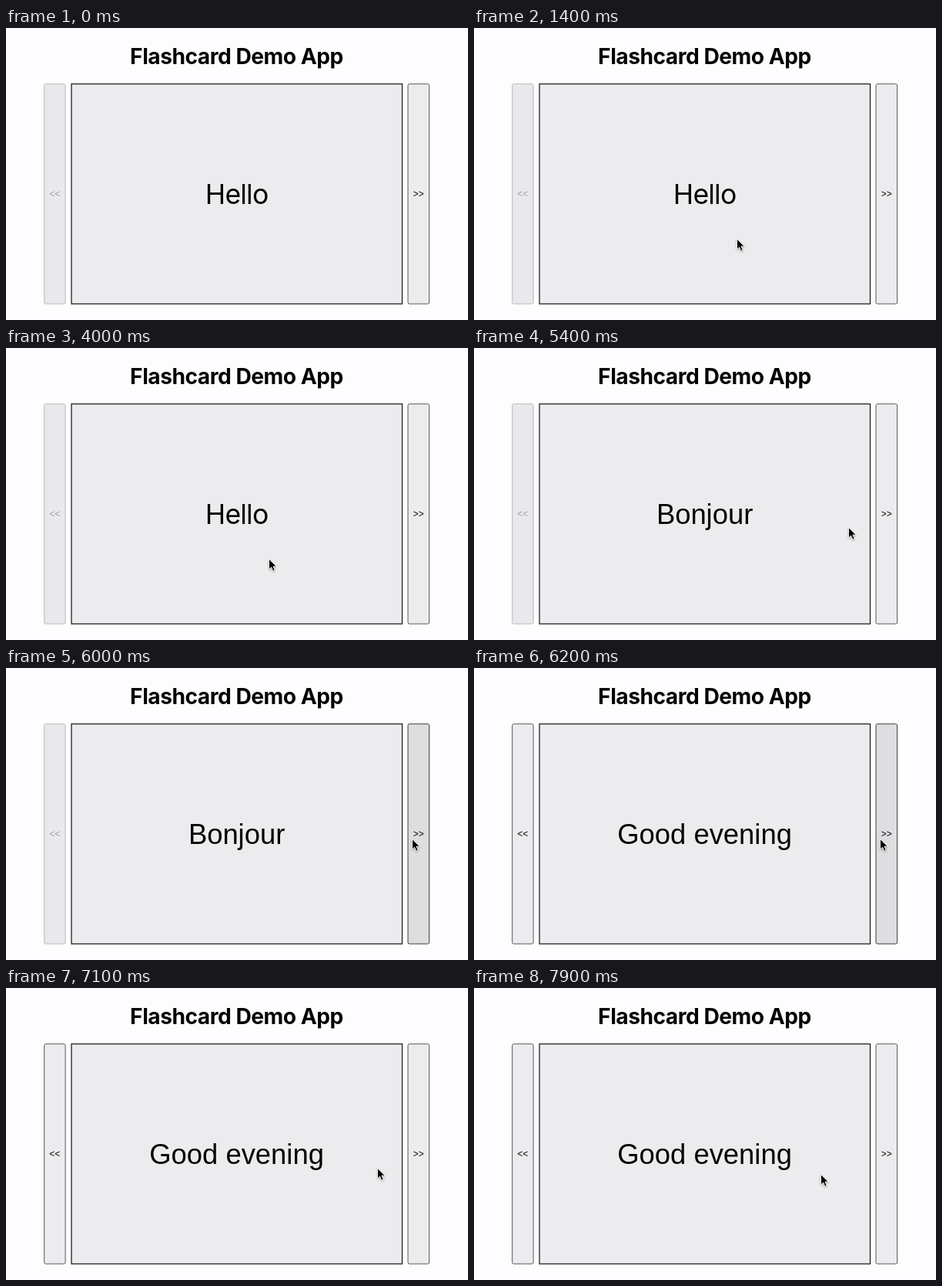
Animation, 600 px wide and 380 px high, one loop 8000 ms. Source, as an HTML page:

```html
<!DOCTYPE html>
<html lang="en">
<head>
<meta charset="utf-8">
<title>Flashcard Demo App</title>
<style>
html, body { margin: 0; width: 100%; height: 100%; overflow: hidden; background: #fdfcfe; }
svg { display: block; width: 600px; height: 380px; }
text { text-anchor: middle; fill: #050505; }
.title { font: 700 28.2px Inter, sans-serif; letter-spacing: -.5px; }
.word { font: 36.4px "Liberation Sans", Arial, sans-serif; }
.greeting { font: 35.5px Inter, sans-serif; letter-spacing: -.8px; }
.label { font: 12px "Liberation Sans", Arial, sans-serif; }
.card { fill: #ecebee; stroke: #19191b; stroke-width: 1.25; }
.button rect { fill: #ecebee; stroke: #58585a; }
.button.disabled rect { fill: #e9e8eb; stroke: #b9b8bb; }
.button.disabled text { fill: #a2a1a4; }
.button.hover rect { fill: #dedde0; stroke: #3c3c3e; }
#cursor { filter: drop-shadow(0 1px 1px #0005); }
</style>
</head>
<body>
<svg viewBox="0 0 600 380">
  <text class="title" x="299.5" y="47">Flashcard Demo App</text>
  <rect class="card" x="85" y="72.8" width="429.5" height="286.2"/>
  <text id="word" x="299.6" y="228.5"></text>
  <g id="prev" class="button">
    <rect x="49.7" y="72.8" width="27.4" height="286.2" rx="2"/>
    <text class="label" x="63.3" y="219.5">&lt;&lt;</text>
  </g>
  <g id="next" class="button">
    <rect x="522" y="72.8" width="27.6" height="286.2" rx="2"/>
    <text class="label" x="535.8" y="219.5">&gt;&gt;</text>
  </g>
  <path id="cursor" d="M0 0V13.6L3.1 10.7L5.3 15.8L7.7 14.8L5.5 9.7H9.7Z"
        fill="#000" stroke="#fff" stroke-width=".9" stroke-linejoin="round"/>
</svg>
<script>
const LOOP = 8000, TICK = 100;
const [word, prev, next, cursor] =
  ["word", "prev", "next", "cursor"].map(id => document.getElementById(id));

// [time, x, y]
const path = [
  [900, 337, 307], [1100, 338, 289], [1400, 341, 274],
  [5100, 341, 274], [5200, 378, 263], [5400, 486, 233], [5600, 519, 224], [6000, 527, 222],
  [6800, 527, 222], [7100, 482, 234], [7400, 450, 242], [LOOP, 450, 242]
];
const words = [
  [0, "Hello"], [1700, "Bonjour"], [3700, "Hello"], [4900, "Bonjour"], [6200, "Good evening"]
];

function cursorAt(t) {
  const i = path.findIndex(([end]) => end > t);
  const [t0, x0, y0] = path[i - 1], [t1, x1, y1] = path[i];
  const k = (t - t0) / (t1 - t0);
  return [x0 + (x1 - x0) * k, y0 + (y1 - y0) * k];
}

function draw(now) {
  const t = Math.floor(now % LOOP / TICK) * TICK;
  const text = words.findLast(([start]) => start <= t)[1];
  const visible = t >= path[0][0];
  const [x, y] = visible ? cursorAt(t) : [0, 0];

  word.textContent = text;
  word.setAttribute("class", text === "Hello" ? "greeting" : "word");
  cursor.setAttribute("visibility", visible ? "visible" : "hidden");
  cursor.setAttribute("transform", `translate(${x + .5} ${y + .5})`);
  prev.classList.toggle("disabled", t < 6200);
  next.classList.toggle("hover", x >= 522);
}

const start = performance.now();
function frame() {
  draw(performance.now() - start);
  requestAnimationFrame(frame);
}
frame();
</script>
</body>
</html>
```
